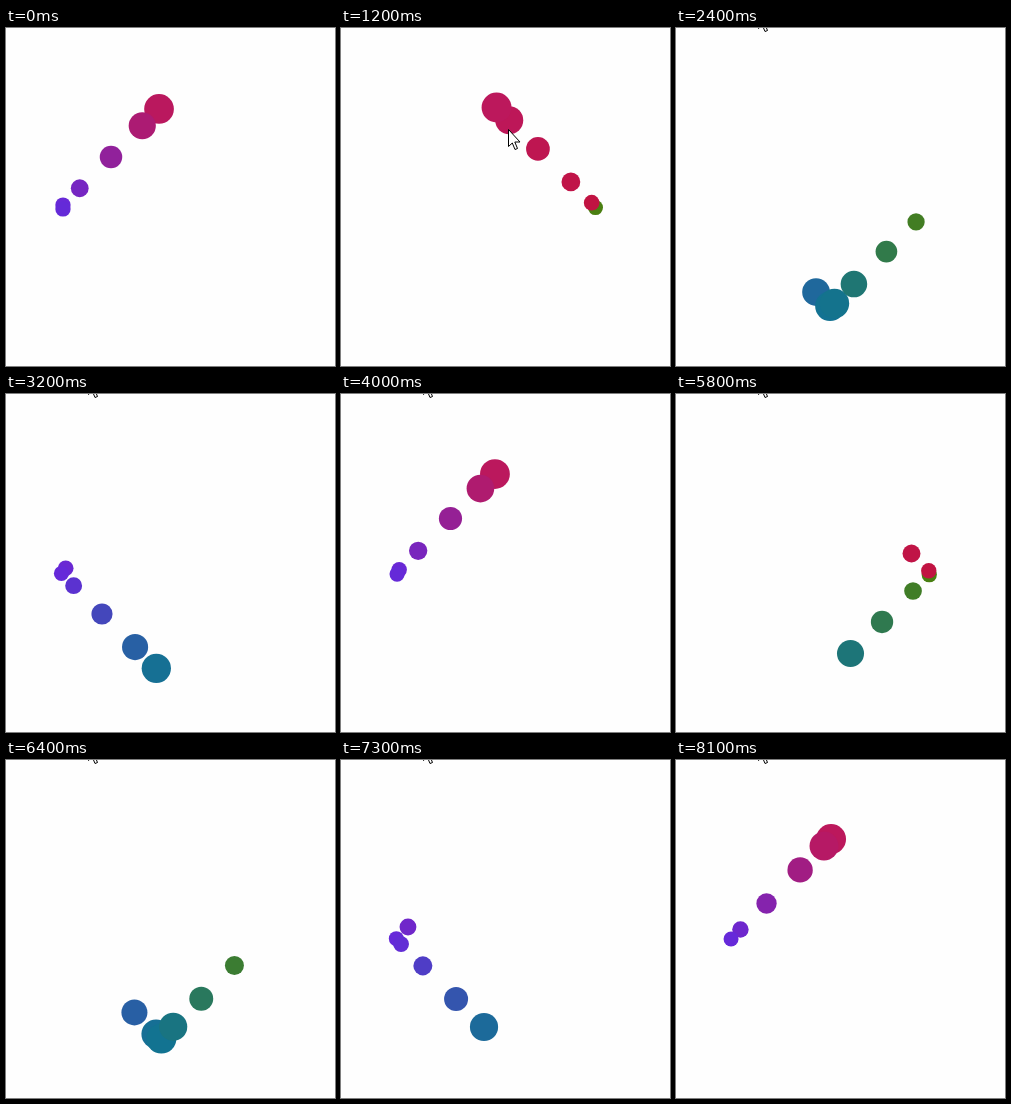
An HTML page with a canvas that plays this animation: 329 px wide and 338 px high, repeating every 8.2 s.

```html
<!DOCTYPE html>
<html lang="en">
<head>
<meta charset="utf-8">
<title>Orbiting dots</title>
<style>
  html, body { margin: 0; width: 100%; height: 100%; overflow: hidden; background: #fefefe; }
  canvas { display: block; }
</style>
</head>
<body>
<canvas id="stage" width="329" height="338"></canvas>
<script>
const ctx = document.getElementById('stage').getContext('2d');

const TICK = 100, TICKS = 82;
const HOLDS = [11, 21, 33, 44, 55, 66, 76];  // ticks on which the picture stands still
const BALLS = 6, LAG = 0.2;

// Corners of the diamond; the colour jumps on passing the right one.
const LEFT   = { x: 55,  y: 179, r: 7.5, c: [102, 41, 217] };
const TOP    = { x: 155, y: 79,  r: 15,  c: [188, 24, 92] };
const RIGHT  = { x: 255, y: 179, r: 7.5, c: [74, 127, 16] };
const BOTTOM = { x: 155, y: 279, r: 15,  c: [18, 115, 145] };
const END    = { ...RIGHT, c: [193, 19, 65] };
const SIDES = [[LEFT, TOP], [TOP, END], [RIGHT, BOTTOM], [BOTTOM, LEFT]];

// Pointer stops: step, x, y
const POINTER = [[4, 190, 44], [9, 167, 101], [11, 167, 101], [18, 82, -17]];
const ARROW = [[0, 0], [0, 17], [3.8, 13.5], [6.5, 20], [9, 19], [6.3, 12.5], [11.5, 12.5]];

const lerp = (a, b, p) => a + (b - a) * p;

// cubic-bezier(.42, 0, .58, 1)
function easeInOut(x) {
  let lo = 0, hi = 1;
  for (let i = 0; i < 24; i++) {
    const u = (lo + hi) / 2, v = 1 - u;
    if (3 * v * v * u * 0.42 + 3 * v * u * u * 0.58 + u * u * u < x) lo = u;
    else hi = u;
  }
  return lo * lo * (3 - 2 * lo);
}

function drawBall(pos) {
  pos = (pos + 4) % 4;
  const side = Math.floor(pos);
  const [a, b] = SIDES[side];
  const p = easeInOut(pos - side);
  ctx.fillStyle = `rgb(${a.c.map((v, i) => Math.round(lerp(v, b.c[i], p)))})`;
  ctx.beginPath();
  ctx.arc(lerp(a.x, b.x, p), lerp(a.y, b.y, p), lerp(a.r, b.r, p), 0, Math.PI * 2);
  ctx.fill();
}

function drawPointer(step) {
  if (step < POINTER[0][0]) return;
  let [, x, y] = POINTER[POINTER.length - 1];
  const i = POINTER.findIndex(stop => stop[0] > step);
  if (i > 0) {
    const a = POINTER[i - 1], b = POINTER[i];
    const p = (step - a[0]) / (b[0] - a[0]);
    x = Math.round(lerp(a[1], b[1], p));
    y = Math.round(lerp(a[2], b[2], p));
  }
  ctx.beginPath();
  ARROW.forEach(([dx, dy]) => ctx.lineTo(x + dx + 0.5, y + dy + 0.5));
  ctx.closePath();
  ctx.fillStyle = '#fff';
  ctx.fill();
  ctx.strokeStyle = '#000';
  ctx.lineWidth = 1;
  ctx.stroke();
}

function draw(ms) {
  const tick = Math.floor(ms / TICK) % TICKS;
  const step = tick - HOLDS.filter(h => h <= tick).length;
  const lead = step ? 0.8375 + 0.1105 * step : 0.9;
  ctx.fillStyle = '#fefefe';
  ctx.fillRect(0, 0, 329, 338);
  for (let i = 0; i < BALLS; i++) drawBall(lead - i * LAG);
  drawPointer(step);
}

let start;
function loop(now) {
  start ??= now;
  draw(now - start);
  requestAnimationFrame(loop);
}
draw(0);
requestAnimationFrame(loop);
</script>
</body>
</html>
```
